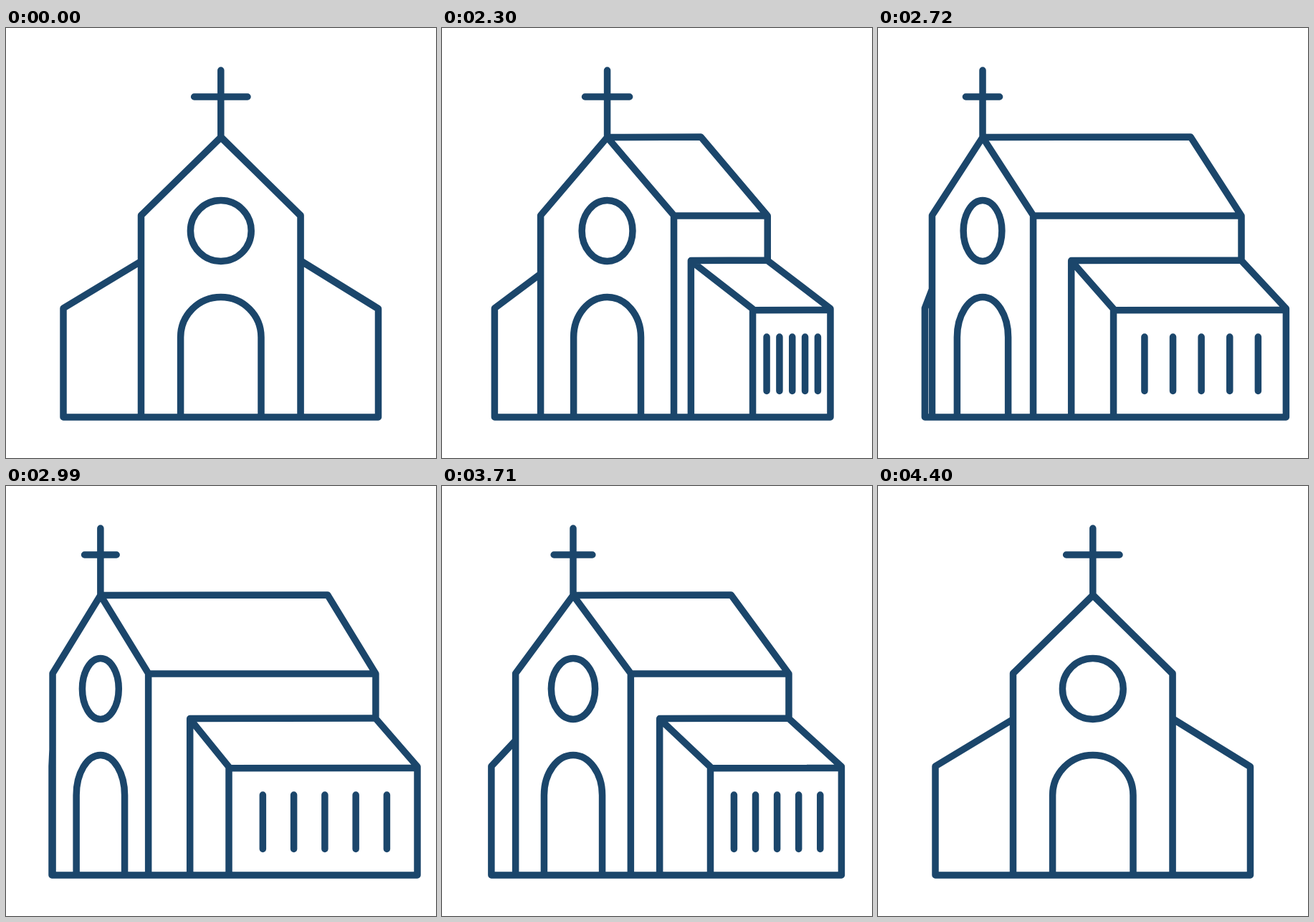
Write an HTML page that moves like this. It is 600x600 px and loops after 4.43 s.

```html
<!DOCTYPE html>
<html lang="en">
<head>
<meta charset="utf-8">
<title>Church</title>
<style>
  html, body { margin: 0; width: 100%; height: 100%; overflow: hidden; background: #fff; }
  svg { display: block; width: 100vw; height: 100vh; }
  path { fill: none; stroke: #1b466b; stroke-width: 9.5; stroke-linecap: round; stroke-linejoin: round; }
</style>
</head>
<body>
<svg viewBox="0 0 600 600"><path id="church"/></svg>
<script>
const church = document.getElementById('church');
const LOOP = 4430, STEP = 30, FIRST = 2030;
const DEPTH = 321.8; // roof length at the widest turn
const GROUND = 543;

// Bezier easing with control points (a, 0) and (b, 1)
function ease(a, b, u) {
  if (u <= 0) return 0;
  if (u >= 1) return 1;
  let lo = 0, hi = 1, s = 0.5;
  for (let i = 0; i < 30; i++) {
    s = (lo + hi) / 2;
    const r = 1 - s;
    const x = 3 * s * r * r * a + 3 * s * s * r * b + s * s * s;
    if (x < u) lo = s; else hi = s;
  }
  return s * s * (3 - 2 * s);
}

function turn(t) {
  if (t < FIRST) return 0;
  t -= (t - FIRST) % STEP;
  return t < 3200
    ? ease(0.3, 0.13, (t - 2000) / 1200)
    : 1 - ease(0.612, 0.394, (t - 3200) / 1200);
}

const line = (...pts) => 'M' + pts.map(p => p.map(v => v.toFixed(2)).join(' ')).join('L');

function shape(d) {
  const apex = 299.8 - 0.53 * d;
  const k = 1 - d * 0.001262;
  const front = x => apex + x * k;
  const left = front(-111.3), right = front(111.3);
  const wing = 80 - 0.0505 * d;
  const ridge = 299.8 + 0.47 * d;
  const back = 411 + 0.331 * d;
  const aisle = 411 - 0.487 * d;
  const near = 519.5 - 0.658 * d;
  const far = 519.5 + 0.172 * d;
  const rose = 42.4 * k, arch = 56.2 * k;

  const parts = [
    line([apex, 59], [apex, 152.5]),
    line([front(-37.2), 96], [front(37.2), 96]),
    line([left, GROUND], [left, 261.5], [apex, 152.5], [right, 261.5], [right, GROUND]),
    line([apex, 152.5], [ridge, 152], [back, 262], [back, 324.5]),
    line([right, 262], [back, 262]),
    line([left, 325.5 + 0.134 * d], [wing, 391], [wing, GROUND], [far, GROUND], [far, 391.5], [back, 324.5]),
    line([back, 324], [aisle, 324.5], [aisle, GROUND]),
    line([aisle, 325], [near, 392], [near, GROUND]),
    line([near, 393.8], [far, 393.5]),
    `M${apex - rose} 283a${rose} 42.4 0 1 1 ${2 * rose} 0a${rose} 42.4 0 1 1 ${-2 * rose} 0Z`,
    `M${apex - arch} ${GROUND}V431.5a${arch} 56 0 0 1 ${2 * arch} 0V${GROUND}`
  ];
  for (let i = 0; i < 5; i++) {
    const x = near + (far - near) * (0.18 + 0.1645 * i);
    parts.push(line([x, 431], [x, 506.5]));
  }
  return parts.join('');
}

const start = performance.now();
function draw() {
  const t = (performance.now() - start) % LOOP;
  church.setAttribute('d', shape(DEPTH * turn(t)));
  requestAnimationFrame(draw);
}
draw();
</script>
</body>
</html>
```
